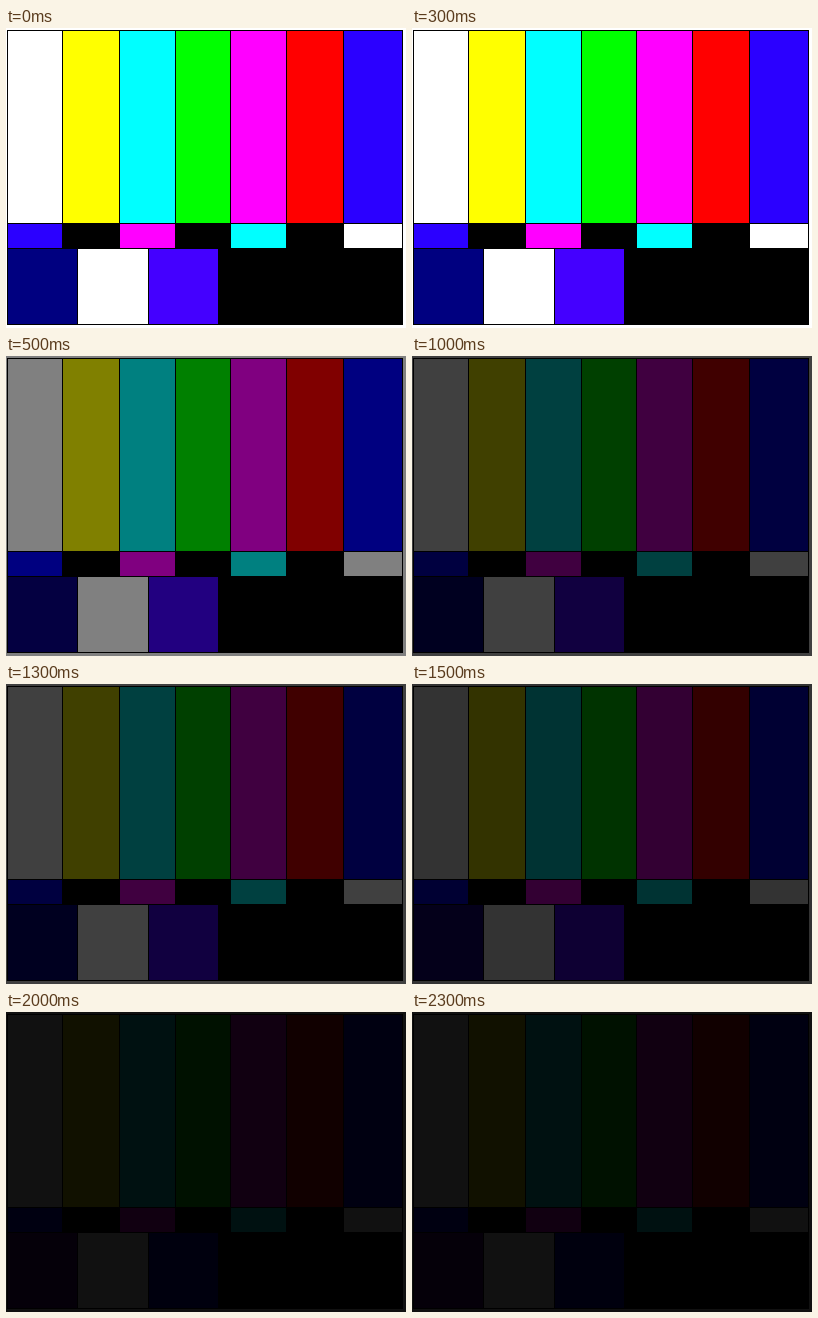
Animation, 400 px wide and 300 px high, one loop 2500 ms. Source, as an HTML page:

```html
<!DOCTYPE html>
<html lang="en">
<head>
<meta charset="utf-8">
<title>Fading colour bars</title>
<style>
html, body { margin: 0; width: 100%; height: 100%; overflow: hidden; background: #000; }
svg { display: block; width: 400px; height: 300px; }
.white { fill: #fff; }
.yellow { fill: #ff0; }
.cyan { fill: #0ff; }
.green { fill: #0f0; }
.magenta { fill: #f0f; }
.red { fill: #f00; }
.blue, .navy, .violet, .shade { animation: 2.5s step-end infinite; }
.blue { animation-name: blue; }
.navy { animation-name: navy; }
.violet { animation-name: violet; }
.shade { animation-name: dim; }

/* Five held brightness levels, each 500 ms */
@keyframes dim {
  0% { opacity: 0; }
  20% { opacity: .498; }
  40% { opacity: .75; }
  60% { opacity: .8; }
  80%, 100% { opacity: .935; }
}
/* The blues drift in hue as they darken */
@keyframes blue {
  0% { fill: #2b00ff; }
  20%, 100% { fill: #00f; }
}
@keyframes navy {
  0% { fill: #000080; }
  20% { fill: #080080; }
  40% { fill: #000080; }
  60% { fill: #140080; }
  80%, 100% { fill: #500080; }
}
@keyframes violet {
  0%, 60% { fill: #40f; }
  80%, 100% { fill: #0000d0; }
}
</style>
</head>
<body>
<svg viewBox="0 0 400 300" shape-rendering="crispEdges">
  <rect class="white" width="400" height="300"/>
  <rect x="1" y="2" width="396" height="295"/>

  <rect class="white" x="2" y="3" width="54" height="192"/>
  <rect class="yellow" x="57" y="3" width="56" height="192"/>
  <rect class="cyan" x="114" y="3" width="55" height="192"/>
  <rect class="green" x="170" y="3" width="54" height="192"/>
  <rect class="magenta" x="225" y="3" width="55" height="192"/>
  <rect class="red" x="281" y="3" width="56" height="192"/>
  <rect class="blue" x="338" y="3" width="58" height="192"/>

  <rect class="blue" x="2" y="196" width="54" height="24"/>
  <rect class="magenta" x="114" y="196" width="55" height="24"/>
  <rect class="cyan" x="225" y="196" width="55" height="24"/>
  <rect class="white" x="338" y="196" width="58" height="24"/>

  <rect class="navy" x="2" y="221" width="69" height="75"/>
  <rect class="white" x="72" y="221" width="70" height="75"/>
  <rect class="violet" x="143" y="221" width="69" height="75"/>

  <rect class="shade" width="400" height="300"/>
</svg>
</body>
</html>
```
